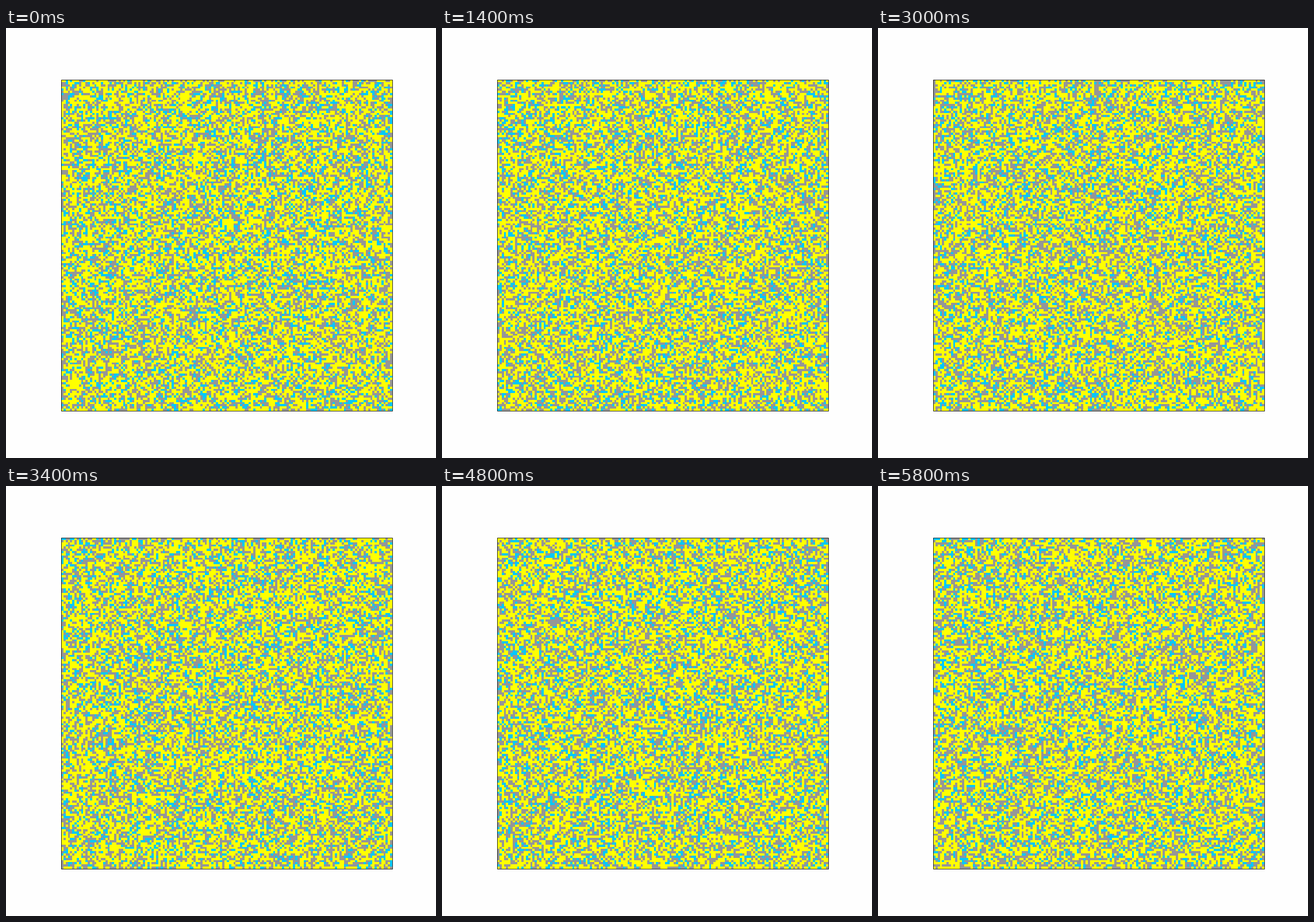
A matplotlib script for the animation above (6 s loop, 748x748 px).

```python
import numpy as np
import matplotlib.pyplot as plt
from matplotlib.animation import FuncAnimation
from matplotlib.colors import ListedColormap
from matplotlib.patches import Rectangle

SIZE, DPI = 748, 64
LEFT, TOP, SIDE = 96, 90, 576
BOTTOM = SIZE - TOP - SIDE
CELLS = 150
FRAMES, STEP = 30, 200
COLORS = ["#ffff00", "#969696", "#00c8ff"]
SHARES = [0.51, 0.33, 0.16]


def grid(step):
    rng = np.random.default_rng(700 + step)
    return rng.choice(len(COLORS), size=(CELLS, CELLS), p=SHARES)


fig = plt.figure(figsize=(SIZE / DPI, SIZE / DPI), dpi=DPI, facecolor="#fefefe")
ax = fig.add_axes([LEFT / SIZE, BOTTOM / SIZE, SIDE / SIZE, SIDE / SIZE])
ax.axis("off")
image = ax.imshow(grid(0), cmap=ListedColormap(COLORS), vmin=0, vmax=2,
                  interpolation="nearest", aspect="auto")

# Thin border centred on whole pixels
fig.add_artist(Rectangle((LEFT + 0.5, BOTTOM - 0.5), SIDE, SIDE, fill=False,
                         edgecolor="black", linewidth=0.8 * 72 / DPI,
                         joinstyle="miter", snap=False, transform=None))


def update(i):
    # The opening state is held for two steps
    image.set_data(grid(max(i - 1, 0)))
    return [image]


anim = FuncAnimation(fig, update, frames=FRAMES, interval=STEP,
                     repeat=True, repeat_delay=0, blit=False)
plt.show()
```
